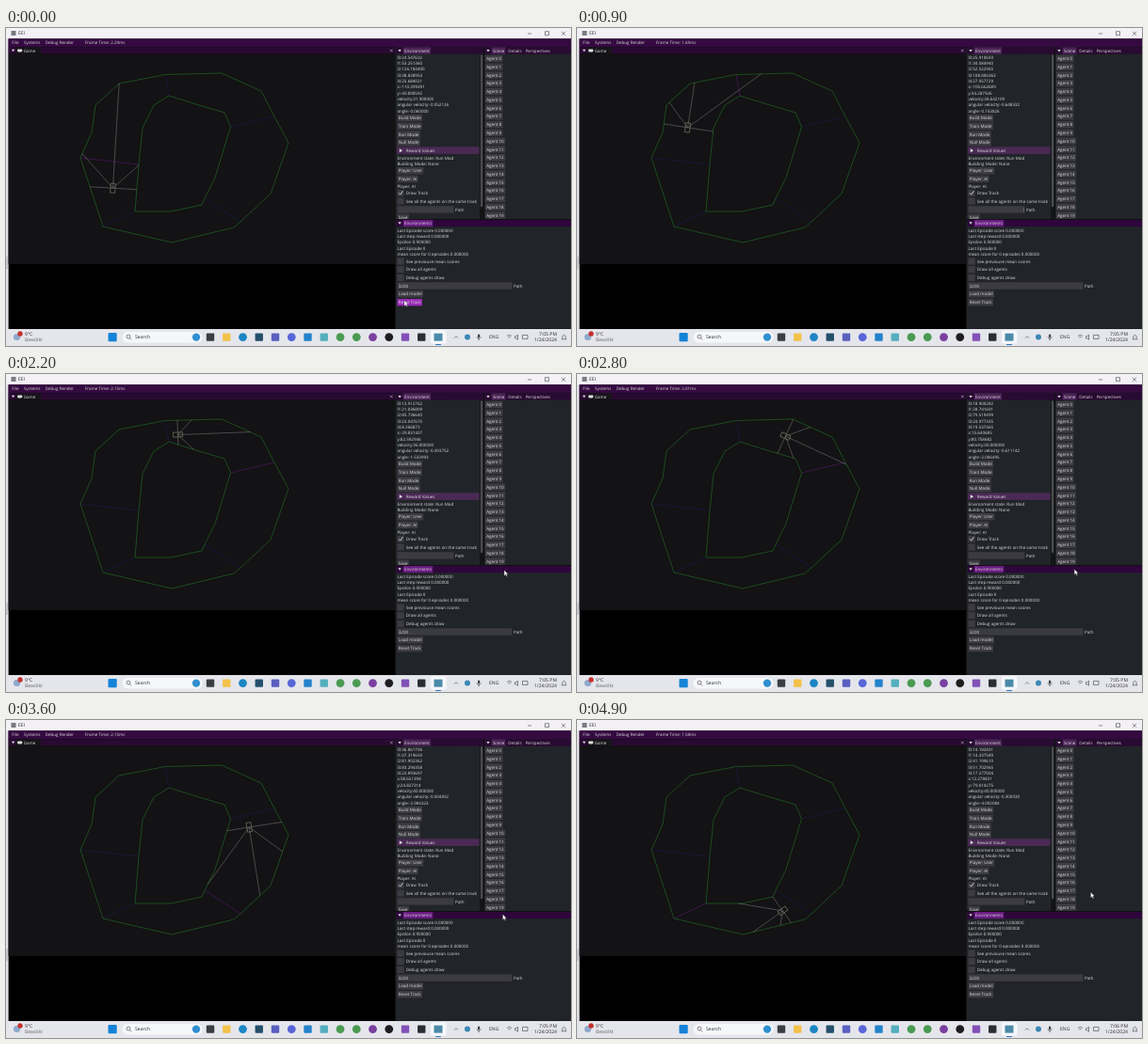
Recreate the animation shown at these times as an HTML page. Size 600 px wide and 338 px high, loop 5000 ms.

```html
<!DOCTYPE html>
<html lang="en">
<head>
<meta charset="utf-8">
<title>Track simulation</title>
<style>
html, body { margin: 0; width: 100%; height: 100%; overflow: hidden; background: #000; }
svg { display: block; width: 100vw; height: 100vh; }
text { font: 4.5px "Open Sans", "Noto Sans", sans-serif; fill: #dcdcde; text-rendering: geometricPrecision; white-space: pre; }
.os { font-size: 5.1px; fill: #2c2c32; }
.grey { fill: #6a6a70; }
.end { text-anchor: end; }
.thin { fill: none; stroke: #3c3c44; stroke-width: .6; }
.track { fill: none; stroke: #237428; stroke-width: .6; }
.gate { stroke: #1a1a50; stroke-width: .6; }
.next { stroke: #561670; }
.rays { stroke: #999996; stroke-width: .42; }
.car { fill: none; stroke: #8c8670; stroke-width: .6; }
</style>
</head>
<body>
<svg id="stage" viewBox="0 0 600 338" preserveAspectRatio="none"></svg>
<script>
const LOOP = 5000, STEP = 100;
const stage = document.getElementById('stage');

function add(tag, attrs, content) {
  const el = document.createElementNS('http://www.w3.org/2000/svg', tag);
  for (const k in attrs) el.setAttribute(k, attrs[k]);
  if (content !== undefined) el.textContent = content;
  stage.appendChild(el);
  return el;
}
const rect = (x, y, width, height, fill, rx = 0) => add('rect', { x, y, width, height, fill, rx });
const disc = (cx, cy, r, fill) => add('circle', { cx, cy, r, fill });
const path = (d, attrs) => add('path', { d, ...attrs });
const poly = (pts, close) => 'M' + pts.map(p => p.join(' ')).join('L') + (close ? 'Z' : '');
// y is the middle of the capitals
const label = (x, y, s, cls = '') => add('text', { x, y: y + 1.65, class: cls }, s);

const LIGHT = '#dcdcde', BUTTON = '#3c3b42', PANEL = '#212428';
const BAR = '#290a32', TAB = '#4a2456', LEFT = 415.4, ROW = 8.7, LINE = 6.34;

function button(x, y, s, w) {
  const box = rect(x, y - 3.7, 20, 7.4, BUTTON);
  const t = label(x + 1.4, y, s);
  box.setAttribute('width', w || t.getComputedTextLength() + 2.8);
  return box;
}
function check(y, s, on) {
  rect(LEFT, y - 3.6, 7.3, 7.2, BUTTON);
  if (on) path(`M417 ${y}l1.6 1.8l2.8-3.8`, { fill: 'none', stroke: LIGHT, 'stroke-width': .9 });
  label(424.8, y, s);
}
// A tab bar with its first tab open
function tabs(x, y, w, names, bar, open, gap = 4) {
  rect(x, y, w, 7.2, bar);
  path(`M${x + 2} ${y + 2.4}h3.4l-1.7 2.5z`, { fill: LIGHT });
  const box = rect(x + 7.4, y, 0, 7.2, open);
  let left = x + 8.6;
  names.forEach((s, i) => {
    const width = label(left, y + 3.5, s).getComputedTextLength();
    if (!i) box.setAttribute('width', width + 2.4);
    left += width + gap;
  });
}

// Window frame and menu
rect(0, 0, 600, 338, '#e4e2e8');
rect(0, 0, 600, 11.4, '#f3f1f6');
rect(5.5, 3, 5, 5, '#777a82');
label(13, 5.6, 'EEI', 'os');
path('M554 6h4M572.5 3.7h4v4h-4zM590 3.8l4 4m0-4l-4 4', { class: 'thin' });
rect(2.6, 11.4, 597.4, 308.6, '#000');
rect(2.6, 11.4, 597.4, 9, '#350a41');
label(6.3, 15.8, 'File');
label(19, 15.8, 'Systems');
label(41.7, 15.8, 'Debug Render');
const frameTime = label(84, 15.8, '');

// Game view
rect(2.6, 20.4, 411, 7.3, BAR);
rect(11, 20.4, 26, 7.3, '#171519');
path('M5.9 22.8h3.4l-1.7 2.5z', { fill: LIGHT });
rect(12, 22.6, 5.4, 2.8, LIGHT, 1.3);
label(18.8, 24, 'Game');
path('M408 22.7l2.6 2.6m0-2.6l-2.6 2.6', { stroke: '#bbb', 'stroke-width': .6 });
rect(2.6, 27.7, 411, 223.3, '#131214');
rect(0, 243, 2, 13, '#c9c7ce');

// Environment panel
rect(413.5, 20.4, 186.5, 183.6, PANEL);
tabs(414.4, 20.5, 92.6, ['Environment'], BAR, TAB);
const NAMES = ['l0:', 'l1:', 'l2:', 'l3:', 'l4:', 'x:', 'y:', 'velocity:', 'angular velocity:', 'angle:'];
const readouts = NAMES.map((n, i) => label(LEFT, 31 + i * LINE, n));
['Build', 'Train', 'Run', 'Null'].forEach((s, i) => button(LEFT, 95.6 + i * ROW, s + ' Mode'));
rect(415, 126.3, 87.5, 7.6, '#4a2a55');
path('M417.8 128.2l3.3 2l-3.3 2z', { fill: LIGHT });
label(424.8, 130.2, 'Reward Values');
label(LEFT, 138, 'Environment state: Run Mod');
label(LEFT, 144.2, 'Building Mode: None');
button(LEFT, 151.8, 'Player: User');
button(LEFT, 160.4, 'Player: AI');
label(LEFT, 167.9, 'Player: AI');
check(175.3, 'Draw Track', true);
check(184, 'See all the agents on the same track');
button(LEFT, 192.9, '', 60);
label(477, 192.9, 'Path');
button(LEFT, 201.4, 'Save');
rect(503, 27.7, 4, 176.3, '#141517');
rect(503.9, 28.2, 2.4, 162, '#4c4d51', 1.2);

// Scene panel
rect(507, 20.4, 1, 183.6, '#0e0e10');
tabs(508.3, 20.5, 91.7, ['Scene', 'Details', 'Perspectives'], BAR, TAB);
for (let i = 0; i < 20; i++) button(508.8, 32.5 + i * 8.76, 'Agent ' + i);

// Environments panel
rect(413.5, 203, 186.5, 117, PANEL);
rect(413.5, 203, 186.5, 1, '#0e0e10');
tabs(414.4, 203.9, 185.6, ['Environments'], '#2e063b', '#691c82');
['Last Episode score 0.000000', 'Last step reward 0.000000', 'Epsilon 0.900000', 'Last Episode 0',
 'mean score for 0 episodes 0.000000'].forEach((s, i) => label(LEFT, 215 + i * LINE, s));
['See previouse mean scores', 'Draw all agents', 'Debug agents draw'].forEach((s, i) => check(248 + i * ROW, s));
button(LEFT, 274, '3200', 122);
label(539, 274, 'Path');
button(LEFT, 282.8, 'Load model');
const reset = button(LEFT, 291.6, 'Reset Track');

// Taskbar
rect(0, 320, 600, 18, '#e5e6eb');
disc(11.5, 328.5, 3.6, '#8fa9cc');
disc(15, 325, 2.7, '#c4302b');
label(20, 325.2, '9°C', 'os');
label(20, 331.8, 'Bewölkt', 'os grey');
rect(123.5, 323, 85, 11.4, '#f6f7f9', 5.7);
path('M132 328a2 2 0 1 0-4 0a2 2 0 1 0 4 0m-.6 1.5l1.8 1.9', { class: 'thin' });
label(137, 328.6, 'Search', 'os');
rect(108.5, 324, 9.2, 9.2, '#1583d8', 1);
disc(202, 328.6, 4.2, '#2f8fd0');
const icons = '#3b3d44 #f2c14a #1c86c4 #24506c #5a5fc0 #5865d8 #2382cc #53aebd #4a9a52 #4a9a52 #7a3fa0 #1d1d1f #8250b8 #2b2d33'.split(' ');
const round = [2, 5, 8, 9, 10, 11];
icons.forEach((c, i) => {
  const x = 217 + i * 17.25;
  if (round.includes(i)) disc(x, 328.6, 4.4, c);
  else rect(x - 4.2, 324.4, 8.4, 8.4, c, 1);
});
rect(451, 321.6, 16.5, 14, '#f6f7fb', 2);
rect(454.5, 324.6, 9, 8, '#4b8aa8');
rect(456, 336, 6, 1, '#2a74c4', .5);
path('M476 329.6l2-2l2 2M532 327.4q2.5-2.4 5 0M533.2 329q1.3-1.3 2.6 0M540.5 327.6h1.4l1.6-1.4v5l-1.6-1.4h-1.4zM548.5 326.4h5.5v4h-5.5zM590 330.8h5l-.8-1.2v-2q-1.7-2.8-3.4 0v2z', { class: 'thin' });
disc(490, 328.6, 3, '#3b87b5');
rect(501, 325.4, 2.2, 4, '#3c3c44', 1.1);
path('M499.8 328.4q2.3 4.4 4.6 0m-2.3 2v1.8', { class: 'thin' });
label(513, 328.6, 'ENG', 'os');
const clock = label(585, 325.2, '', 'os end');
label(585, 331.8, '1/24/2024', 'os end');

// Track
const outer = [[79, 138], [91, 111], [95, 82], [120, 59], [169, 49.5], [229, 48], [271, 67], [285, 94],
  [300, 122], [281, 176], [249, 206], [242, 212], [176, 228], [103, 211]];
const inner = [[173, 72], [205, 82], [232, 90], [238.5, 105], [222, 159], [211, 181], [208, 188], [175, 195],
  [137, 195], [141, 145], [145, 106], [157, 82]];
const gates = [[0, 9], [4, 0], [7, 3], [10, 5], [13, 8]].map(([o, i]) => [outer[o], inner[i]]);
const gateLines = gates.map(g => path(poly(g)));
[outer, inner].forEach(p => path(poly(p, true), { class: 'track' }));
const walls = [outer, inner].flatMap(p => p.map((a, i) => [a, p[(i + 1) % p.length]]));
const rays = path('', { class: 'rays' });
const car = path('M-2.5-5h5v10h-5z', { class: 'car' });
const cursor = path('', { fill: '#fff', stroke: '#222', 'stroke-width': .3 });
const ARROW = 'M0 0v6l1.4-1.3l1 2.1l.9-.4l-1-2.1h1.8z', BEAM = 'M0-2.5v5';

// time, x, y, heading
const poses = [
  [0, -110.399391, -40.890592, -.06],
  [900, -105.662689, 34.287926, -.153826],
  [1600, -74.479657, 62.050686, -1.061491],
  [2800, 15.640685, 80.758682, -2.006495],
  [3600, 58.651398, 24.827314, -2.984323],
  [4400, 47.934242, -42.61285, -3.792054],
  [4900, 12.278831, -79.014275, -4.092084]
];
// time, x, y
const mouse = [[0, 423, 289.5], [900, 474.5, 193], [1600, 529.5, 209], [3600, 527.5, 206.5],
  [4000, 573, 188], [4400, 545.5, 183]];

// PACE is track units per second of playback; BODY lies between car centre and sensor
const SCALE = .856, PACE = 82, BODY = 4, EIGHTH = Math.PI / 4;
const toScreen = (x, y) => [208 + x * SCALE, 135.2 - y * SCALE];
const mix = (a, b, u) => a + (b - a) * u;
const ease = u => u * u * (3 - 2 * u);
const hermite = (p, q, m, n, u) => mix(p, q, ease(u)) + u * (1 - u) * (m * (1 - u) - n * u);

function segment(keys, t) {
  let i = 0;
  while (i < keys.length - 2 && keys[i + 1][0] <= t) i++;
  const a = keys[i], b = keys[i + 1];
  return [a, b, Math.min(1, (t - a[0]) / (b[0] - a[0]))];
}

// Distance from a point to the nearest wall
function cast([px, py], ang) {
  const dx = Math.sin(ang), dy = -Math.cos(ang);
  let best = 400;
  for (const [[ax, ay], [bx, by]] of walls) {
    const ex = bx - ax, ey = by - ay, det = dx * ey - dy * ex;
    const d = ((ax - px) * ey - (ay - py) * ex) / det;
    const s = ((ax - px) * dy - (ay - py) * dx) / det;
    if (d > 0 && d < best && s >= 0 && s <= 1) best = d;
  }
  return best;
}

// Clockwise degrees around the track, from just before the start
const progress = ([x, y]) => (Math.atan2(x - 190, 138 - y) * 180 / Math.PI + 480) % 360;
const gateMarks = gates.map(([a, b]) => progress([mix(a[0], b[0], .5), mix(a[1], b[1], .5)]));

function speed(s) {
  return s < 1.7 ? 35.3 - 3.4 * Math.cos(s * Math.PI / .85) : Math.min(40, 32 + (s - 1.7) * 8);
}
function noise(t) {
  const r = Math.sin(t * .0731 + 2) * 43758.5453;
  return r - Math.floor(r);
}

function drawCar(t) {
  const [p, q, u] = segment(poses, t);
  const [t0, x0, y0, a0] = p, [t1, x1, y1, a1] = q;
  const dt = (t1 - t0) / 1000, reach = PACE * dt;
  const x = hermite(x0, x1, -Math.sin(a0) * reach, -Math.sin(a1) * reach, u);
  const y = hermite(y0, y1, Math.cos(a0) * reach, Math.cos(a1) * reach, u);
  const a = mix(a0, a1, u);
  const pos = toScreen(x, y);
  const angles = [-2, -1, 0, 1, 2].map(k => k * EIGHTH - a);
  const hits = angles.map(g => cast(pos, g));

  rays.setAttribute('d', hits.map((d, i) =>
    poly([pos, [pos[0] + d * Math.sin(angles[i]), pos[1] - d * Math.cos(angles[i])]])).join(''));
  car.setAttribute('transform', `translate(${pos}) rotate(${-a * 180 / Math.PI})`);

  const turn = (a1 - a0) / dt / 2;
  [...hits.map(d => Math.max(0, d / SCALE - BODY)), x, y, speed(t / 1000), turn, a]
    .forEach((n, i) => readouts[i].textContent = NAMES[i] + n.toFixed(6));

  const next = gateMarks.findIndex(m => m > progress(pos));
  gateLines.forEach((g, i) => g.setAttribute('class', i === next ? 'gate next' : 'gate'));
}

function drawCursor(t) {
  const [m, n, u] = segment(mouse, t);
  const x = mix(m[1], n[1], ease(u)), y = mix(m[2], n[2], ease(u));
  const typing = x < 475.4 && y > 189 && y < 197;
  cursor.setAttribute('d', typing ? BEAM : ARROW);
  cursor.setAttribute('stroke', typing ? '#bbb' : '#222');
  cursor.setAttribute('transform', `translate(${x} ${y})`);
  reset.setAttribute('fill', x < 443 && y > 288 ? '#9a2cb8' : BUTTON);
}

function draw(t) {
  drawCar(t);
  drawCursor(t);
  frameTime.textContent = `Frame Time: ${(1.5 + 2.8 * noise(t) ** 2).toFixed(2)}ms`;
  clock.textContent = t < 4000 ? '7:05 PM' : '7:06 PM';
}

function tick() {
  draw(Math.floor(performance.now() % LOOP / STEP) * STEP);
  requestAnimationFrame(tick);
}
tick();
</script>
</body>
</html>
```
